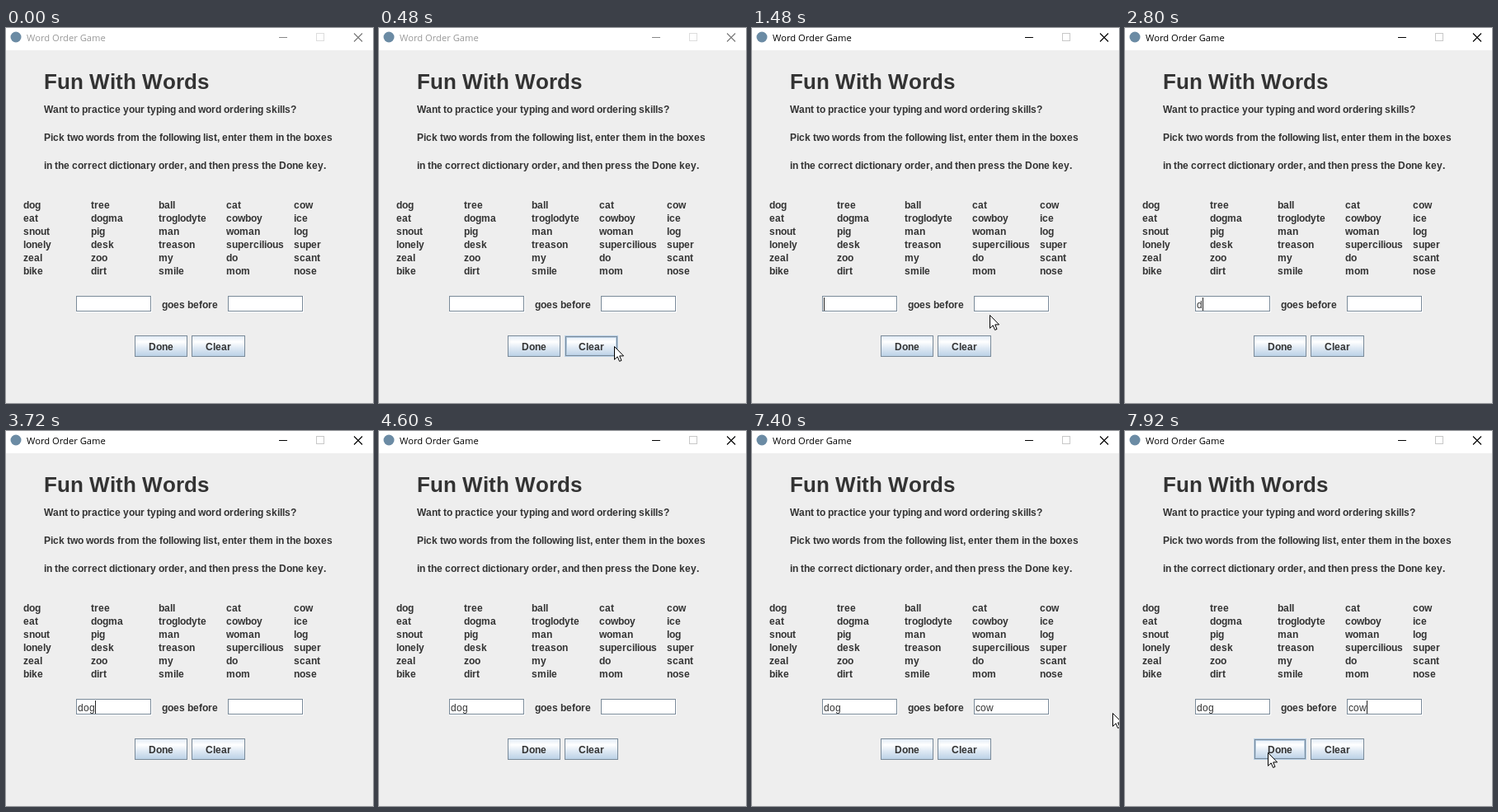
Recreate the animation shown at these times as an HTML page. Size 445 by 455 pixels, loop 8000 ms.

```html
<!DOCTYPE html>
<html lang="en">
<head>
<meta charset="utf-8">
<title>Word Order Game</title>
<style>
  html, body { margin: 0; width: 100%; height: 100%; overflow: hidden; background: #eee; }
  svg { display: block; width: 445px; height: 455px; }
  rect, .lines { shape-rendering: crispEdges; }
  text { font: bold 12px "Liberation Sans", sans-serif; fill: #333; }
  .heading { font-size: 26px; }
  .typed { font-weight: normal; }
  .title { font: 11.2px "Open Sans", sans-serif; }
</style>
</head>
<body>
<svg id="stage" viewBox="0 0 445 455">
  <defs>
    <linearGradient id="shine" x2="0" y2="1">
      <stop offset="0" stop-color="#dde8f3"/>
      <stop offset=".3" stop-color="#fff"/>
      <stop offset=".6" stop-color="#dde8f3"/>
      <stop offset="1" stop-color="#b8cfe5"/>
    </linearGradient>
  </defs>
</svg>
<script>
const stage = document.getElementById("stage");
const LOOP = 8000;

function add(tag, attrs, content = "") {
  const el = document.createElementNS("http://www.w3.org/2000/svg", tag);
  for (const name in attrs) el.setAttribute(name, attrs[name]);
  el.textContent = content;
  stage.append(el);
  return el;
}

const fillRect = (x, y, width, height, fill) => add("rect", { x, y, width, height, fill });
const outline = (x, y, w, h, stroke) =>
  add("rect", { x: x + .5, y: y + .5, width: w - 1, height: h - 1, fill: "none", stroke });
const show = (el, on) => el.setAttribute("visibility", on ? "visible" : "hidden");

// Labels advance by whole pixels per letter.
const pen = document.createElement("canvas").getContext("2d");
function label(x, y, string, style = "") {
  const size = style === "heading" ? 26 : 12;
  const weight = style === "typed" ? "normal" : "bold";
  pen.font = `${weight} ${size}px "Liberation Sans", sans-serif`;
  const places = [];
  for (const letter of string) {
    places.push(x);
    x += Math.round(pen.measureText(letter).width);
  }
  return add("text", { x: places.join(" "), y, class: style }, string);
}

// Title bar
fillRect(0, 0, 445, 27, "#fff");
add("circle", { cx: 12, cy: 11, r: 6.5, fill: "#6b8ba4" });
const title = add("text", { x: 25, y: 16, class: "title" }, "Word Order Game");
const minimize = fillRect(331, 11, 10, 1, "#000");
const maximize = outline(376, 6, 10, 10, "#ccc");
const close = add("path", { d: "M422 6.5l10 10m0-10l-10 10", fill: "none", "stroke-width": 1.1 });

// Instructions and word list
label(46, 74, "Fun With Words", "heading");
label(46, 103, "Want to practice your typing and word ordering skills?");
label(46, 137, "Pick two words from the following list, enter them in the boxes");
label(46, 171, "in the correct dictionary order, and then press the Done key.");
[
  "dog tree ball cat cow",
  "eat dogma troglodyte cowboy ice",
  "snout pig man woman log",
  "lonely desk treason supercilious super",
  "zeal zoo my do scant",
  "bike dirt smile mom nose"
].forEach((line, row) => line.split(" ").forEach((word, column) =>
  label(21 + column * 82, 219 + row * 16, word)));

// Text fields
const fields = [85, 269].map(x => {
  fillRect(x, 325, 92, 20, "#fff");
  outline(x + 1, 326, 91, 19, "#fff");
  outline(x, 325, 91, 19, "#7a8a99");
  return { x, y: 325, w: 92, h: 20 };
});
label(189, 340, "goes before");

// Buttons
const buttons = [["Done", 156, 64], ["Clear", 225, 65]].map(([name, x, w]) => {
  const y = 373, h = 26;
  fillRect(x, y, w, h, "url(#shine)");
  const normal = outline(x, y, w, h, "#7a8a99");
  const hover = [
    outline(x, y, w, h, "#b8cfe5"),
    outline(x + 1, y + 1, w - 2, h - 2, "#7a8a99"),
    outline(x + 2, y + 2, w - 4, h - 4, "#b8cfe5")
  ];
  label(x + 17, 391, name);
  return { x, y, w, h, normal, hover };
});

// Typing: time, letter, its x, caret x afterwards
const keys = [
  [1200, "", 87, 87],
  [2800, "d", 87, 94], [3280, "o", 94, 101], [3720, "g", 101, 108],
  [4120, "", 271, 271],
  [4920, "c", 271, 277], [5200, "o", 277, 284], [5520, "w", 284, 293]
].map(([time, letter, x, caretX]) => ({ time, caretX, el: label(x, 340, letter, "typed") }));
const caret = fillRect(87, 327, 1, 16, "#222");
const caretOff = [[1600, 2080], [2600, 2800], [4600, 4920], [6000, 6520], [7000, 7520]];

// Pointer
const arrow = add("path", {
  d: "M.5 .5V16.3L4.2 12.8L6.6 18.4L9 17.4L6.7 11.9H11.6Z", fill: "#fff", stroke: "#000"
});
const beam = add("path", {
  d: "M-3 -6.5H0M1 -6.5H4M.5 -6V7M-3 7.5H0M1 7.5H4", fill: "none", stroke: "#000", class: "lines"
});
const pointerStops = [
  [0], [200, 372, 440], [320, 330, 412], [400, 285, 386], [520, 235, 362],
  [600, 185, 346], [720, 140, 336], [800, 108, 333], [920, 114, 333],
  [1400, 190, 339], [1480, 288, 348], [1600],
  [7400, 437, 342], [7520, 330, 335], [7600, 205, 331], [7720, 97, 330],
  [7800, 135, 364], [7920, 173, 390]
];

const inside = (box, x, y) =>
  x >= box.x && x < box.x + box.w && y >= box.y && y < box.y + box.h;

function drawWindowState(t) {
  const active = t >= 1120;
  title.style.fill = active ? "#000" : "#999";
  minimize.setAttribute("fill", active ? "#000" : "#888");
  close.setAttribute("stroke", active ? "#000" : "#777");
  maximize.setAttribute("stroke", active ? "#c8c8c8" : "#ddd");
}

function drawTyping(t) {
  keys.forEach(key => show(key.el, t >= key.time));
  const last = keys.findLast(key => t >= key.time);
  if (last) caret.setAttribute("x", last.caretX);
  show(caret, last && !caretOff.some(([from, to]) => t >= from && t < to));
}

function drawPointer(t) {
  const [, x, y] = pointerStops.findLast(stop => t >= stop[0]);
  const present = x !== undefined;
  const overField = fields.some(field => inside(field, x, y));
  show(arrow, present && !overField);
  show(beam, present && overField);
  if (present) {
    for (const el of [arrow, beam]) el.setAttribute("transform", `translate(${x} ${y})`);
  }
  for (const button of buttons) {
    const over = present && inside(button, x, y);
    show(button.normal, !over);
    button.hover.forEach(el => show(el, over));
  }
}

const start = performance.now();
function frame() {
  const t = (performance.now() - start) % LOOP;
  drawWindowState(t);
  drawTyping(t);
  drawPointer(t);
  requestAnimationFrame(frame);
}
frame();
</script>
</body>
</html>
```
